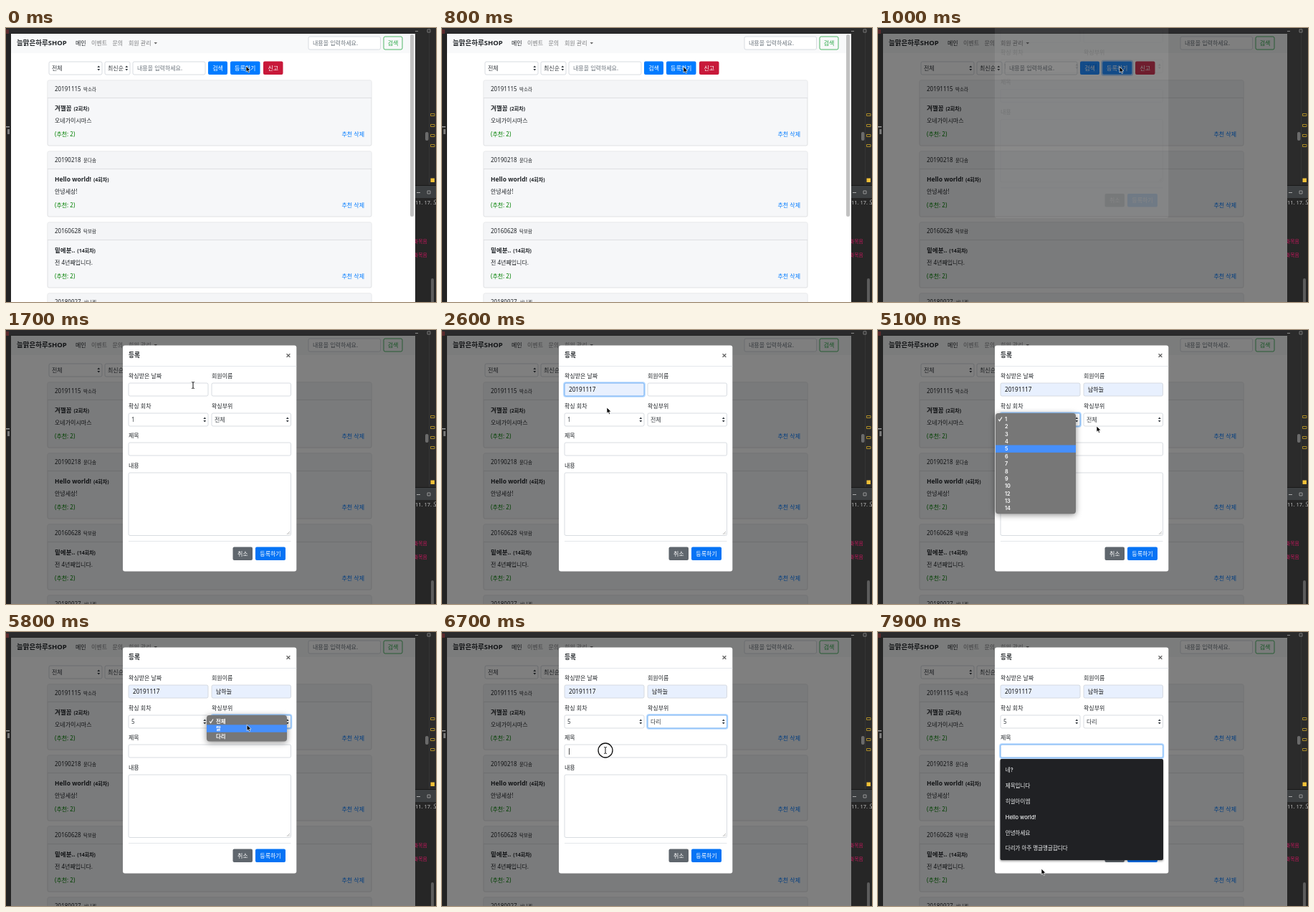
Animation, 600 px wide and 382 px high, one loop 8 s. Source, as an HTML page with a canvas:

```html
<!DOCTYPE html>
<html lang="ko">
<head>
<meta charset="utf-8">
<title>등록</title>
<style>
html, body { margin: 0; width: 100%; height: 100%; overflow: hidden; background: #232323; }
canvas { display: block; width: 600px; height: 382px; }
</style>
</head>
<body>
<canvas id="stage"></canvas>
<script>
const LOOP = 8000, STEP = 100;
const INK = '#212529', GRAY = '#3a3f44', MUTED = '#6c757d', BLUE = '#007bff', LINE = '#ced4da';
const SANS = '"Noto Sans", "Noto Sans CJK KR", "Noto Sans CJK", sans-serif';
const UI = 'Inter, "Noto Sans CJK KR", "Noto Sans CJK", sans-serif';

const dpr = window.devicePixelRatio || 1;

function sized(canvas) {
  canvas.width = 600 * dpr;
  canvas.height = 382 * dpr;
  return canvas.getContext('2d');
}

const stage = sized(document.getElementById('stage'));
const layer = sized(document.createElement('canvas'));
let c = stage;

const clamp = v => Math.max(0, Math.min(1, v));
const ramp = (t, from, len) => clamp((t - from) / len);
const during = (t, from, to) => t >= from && t < to;

function text(s, x, y, { size = 8, color = INK, weight = 400, align = 'left', font = SANS } = {}) {
  c.font = `${weight} ${size}px ${font}`;
  c.fillStyle = color;
  c.textAlign = align;
  c.fillText(s, x, y + size * 0.36);
}

function rect(x, y, w, h, fill) {
  c.fillStyle = fill;
  c.fillRect(x, y, w, h);
}

function box(x, y, w, h, fill, stroke, r = 2) {
  c.beginPath();
  c.roundRect(x, y, w, h, r);
  if (fill) { c.fillStyle = fill; c.fill(); }
  if (stroke) { c.strokeStyle = stroke; c.lineWidth = 0.8; c.stroke(); }
}

function path(points, fill, stroke, width = 1) {
  c.beginPath();
  points.forEach(([x, y]) => c.lineTo(x, y));
  if (fill) { c.closePath(); c.fillStyle = fill; c.fill(); }
  if (stroke) { c.strokeStyle = stroke; c.lineWidth = width; c.stroke(); }
}

// Draws a group on its own layer, so that it fades as one.
function faded(alpha, drawGroup) {
  if (alpha <= 0) return;
  if (alpha === 1) return drawGroup();
  c = layer;
  c.setTransform(1, 0, 0, 1, 0, 0);
  c.clearRect(0, 0, layer.canvas.width, layer.canvas.height);
  c.setTransform(dpr, 0, 0, dpr, 0, 0);
  drawGroup();
  c = stage;
  c.globalAlpha = alpha;
  c.drawImage(layer.canvas, 0, 0, 600, 382);
  c.globalAlpha = 1;
}

function shadowed(blur, alpha, drawShape) {
  c.save();
  c.shadowColor = `rgba(0,0,0,${alpha})`;
  c.shadowBlur = blur * dpr;
  c.shadowOffsetY = 1.5 * dpr;
  drawShape();
  c.restore();
}

function button(label, x, y, w, fill) {
  box(x, y, w, 18.5, fill);
  text(label, x + w / 2, y + 9.3, { color: '#fff', align: 'center' });
}

function ring(x, y, w, h, alpha = 1) {
  if (alpha <= 0) return;
  c.save();
  c.globalAlpha = alpha;
  c.beginPath();
  c.roundRect(x - 0.8, y - 0.8, w + 1.6, h + 1.6, 2.5);
  c.strokeStyle = 'rgba(0,123,255,.3)';
  c.lineWidth = 2;
  c.stroke();
  box(x, y, w, h, null, '#80bdff');
  c.restore();
}

function field(x, y, w, { h = 18, value = '', color = GRAY, fill = '#fff', focus = 0, size = 8, pad = 6 } = {}) {
  box(x, y, w, h, fill, LINE);
  ring(x, y, w, h, focus);
  text(value, x + pad, y + 9.3, { color, size });
}

function select(x, y, w, value, focus = 0) {
  field(x, y, w, { value, focus, pad: 4 });
  const ax = x + w - 4.7, ay = y + 9;
  path([[ax - 1.9, ay - 1], [ax, ay - 3.6], [ax + 1.9, ay - 1]], '#343a40');
  path([[ax - 1.9, ay + 1], [ax, ay + 3.6], [ax + 1.9, ay + 1]], '#343a40');
}

function desktop() {
  rect(0, 0, 600, 382, '#232323');
  rect(0, 0, 600, 7, '#2a2a2c');
  rect(0, 2, 4, 6, '#5b2a2c');
  rect(0, 137, 5, 1.5, '#999');
  rect(2, 141, 3, 7, '#777');
  rect(571, 0, 29, 219, '#2b2b2b');
  rect(590, 0, 1, 219, '#353535');
  rect(571, 4, 4, 1, '#888');
  box(588, 2, 4, 4, null, '#888', 0);
  box(585, 145, 4.5, 12, '#6b6b6b');
  [121, 136, 150, 164].forEach(y => box(592.5, y - 1.5, 5.5, 3, null, '#c9a227', 0));
  rect(592.5, 209.5, 5.5, 5.5, '#f2c037');
  rect(571, 219, 29, 18, '#3c3f41');
  rect(571, 219, 29, 1, '#191919');
  rect(573, 229, 5, 1, '#aaa');
  box(588, 227, 4, 4, null, '#aaa', 0);
  rect(571, 237, 29, 145, '#262626');
  text('11. 17. 오', 571, 243, { color: '#bbb', size: 7.5 });
  [298, 317].forEach(y => text('화목음', 569, y, { color: '#c2185b', size: 6.8 }));
  box(593, 349, 4, 40, '#5c5c5c');
}

function card(y, date, name, title, count, body) {
  box(58, y, 452, 91, '#f6f7f9', '#d9dadc');
  rect(58.4, y + 0.4, 451.2, 24, '#f4f5f7');
  rect(58, y + 24, 452, 0.8, '#d9dadc');
  text(date, 68, y + 12.5);
  text(name, 108, y + 13, { size: 6.5 });
  text(title, 68, y + 38.5, { size: 8.5, weight: 700 });
  const w = c.measureText(title).width;
  text(`(${count}회차)`, 71 + w, y + 39, { size: 7, weight: 700 });
  text(body, 68, y + 56.5);
  text('(추천: 2)', 68, y + 75.5, { color: '#008000' });
  text('추천 삭제', 500, y + 75.5, { color: BLUE, align: 'right' });
}

function page(t) {
  rect(7, 8, 564, 374, '#fff');
  rect(7, 8, 564, 27, '#f8f9fa');
  text('늘맑은하루SHOP', 15, 20.5, { size: 9.5, weight: 700 });
  text('메인', 97, 21);
  [['이벤트', 119], ['문의', 148.5], ['회원 관리', 171]].forEach(([s, x]) => text(s, x, 21, { color: '#7c7d7f' }));
  path([[206.5, 20], [211, 20], [208.8, 22.5]], '#666');
  field(422, 12, 100.5, { value: '내용을 입력하세요.', color: MUTED });
  box(527, 12, 26, 18, '#f8f9fa', '#28a745');
  text('검색', 540, 21, { color: '#28a745', align: 'center' });

  select(60, 47, 74, '전체');
  select(138, 47, 35, '최신순');
  field(177, 47, 101, { value: '내용을 입력하세요.', color: MUTED });
  button('검색', 282, 46.5, 27, BLUE);
  button('등록하기', 313, 46.5, 41.5, BLUE);
  ring(313, 46.5, 41.5, 18.5, ramp(t, 800, 100));
  button('신고', 359, 46.5, 27.5, '#c8193a');

  card(73, '20191115', '박소라', '겨깰꼼', 2, '오네가이시마스');
  card(172, '20190218', '윤다솜', 'Hello world!', 4, '안녕세상!');
  card(271, '20160628', '탁보람', '밑에분..', 14, '전 4년째입니다.');
  card(370, '20180927', '서나래', '', 1, '');
  if (t < 900) box(564, 9, 5, 254, '#c1c1c1', null, 2.5);
}

// Strength of a focus ring that is on between two times.
const focus = (t, from, to) => ramp(t, from, 150) * (1 - ramp(t, to, 150));

function caret(t, from, to, since, x, y) {
  if (during(t, from, to) && Math.floor((t - since) / 500) % 2 === 0) rect(x, y, 0.8, 9, '#222');
}

function modal(t) {
  box(163, 21.5, 242.3, 315, '#fff', null, 3);
  text('등록', 171, 35, { size: 8.7, weight: 700 });
  text('×', 394, 35, { size: 13, weight: 700, color: '#666', align: 'center' });
  rect(163, 50, 242.3, 0.8, '#dee2e6');

  [['왁싱받은 날짜', 171, 64], ['회원이름', 287, 64], ['확싱 회차', 171, 106], ['왁싱부위', 287, 106],
   ['제목', 171, 147], ['내용', 171, 189]].forEach(a => text(...a));

  const dated = t >= 2600, named = t >= 3900, preview = during(t, 3400, 3900);
  field(171, 74, 111, {
    value: dated ? '20191117' : '', fill: dated ? '#e8f0fe' : '#fff',
    color: '#111', size: 8.2, focus: focus(t, 1900, 2800)
  });
  field(287, 74, 110.5, {
    value: named ? '남하늘' : preview ? '하늘' : '', fill: named || preview ? '#e8f0fe' : '#fff',
    color: '#111', size: preview ? 6.5 : 8, focus: focus(t, 2800, 4500)
  });
  select(171, 116, 111, t < 5000 ? '1' : '5', focus(t, 4600, 5500));
  select(287, 116, 110.5, t < 6200 ? '전체' : '다리', focus(t, 5500, 6700));
  field(171, 157, 226.5, { focus: focus(t, 6700, LOOP) });
  field(171, 199, 226.5, { h: 87.5 });
  path([[392, 285], [396, 281]], null, '#888', 0.6);
  path([[394.3, 285], [396, 283.3]], null, '#888', 0.6);
  caret(t, 1900, 2600, 1900, 177, 78.5);
  caret(t, 2800, 4400, 2600, 292, 78.5);
  caret(t, 6600, LOOP, 6400, 177, 162);

  rect(171, 294, 226.5, 0.8, '#dee2e6');
  button('취소', 316.5, 302.5, 27.5, '#5f666d');
  button('등록하기', 348, 302.5, 42, '#0573f5');
}

function suggestions(x, y, w, items, my) {
  const row = 21.9;
  shadowed(3, 0.4, () => box(x, y, w, items.length * row + 9.5, '#202124'));
  items.forEach((s, i) => {
    const top = y + 4.5 + i * row;
    if (my >= top && my < top + row) rect(x, top, w, row, '#3f4042');
    text(s, x + 7.3, top + 10.7, { size: 7.5, color: '#f1f3f4', weight: 500, font: UI });
  });
}

const MENU_ROW = 10.37;

function menu(x, w, items, hot) {
  shadowed(8, 0.45, () => box(x, 116, w, items.length * MENU_ROW + 5.5, '#777', null, 4));
  if (items[hot]) rect(x, 119 + hot * MENU_ROW, w, MENU_ROW, '#468ffb');
  items.forEach((s, i) => text(s, x + 13, 124.3 + i * MENU_ROW, { size: 7.3, color: '#fff', weight: 600, font: UI }));
  path([[x + 4, 124.5], [x + 5.6, 126.8], [x + 9, 121.5]], null, '#fff', 1.1);
}

const MOVES = [
  [0, 335, 53], [900, 337, 54], [1200, 337, 54], [1600, 261, 77], [1800, 261, 77], [1900, 240, 83],
  [2200, 230, 108], [2600, 230, 108], [2800, 330, 83], [3000, 330, 83], [3400, 318, 102], [3600, 318, 102],
  [3800, 318, 130], [4000, 318, 130], [4400, 235, 124], [4700, 235, 124], [4900, 225, 166], [5000, 225, 166],
  [5100, 305, 134], [5400, 340, 124], [5700, 340, 124], [6000, 325, 145], [6200, 325, 145],
  [6600, 228, 165], [7000, 228, 165], [7800, 228, 330], [8000, 228, 330]
];

function mouse(t) {
  const i = MOVES.findIndex(m => m[0] > t);
  const [t0, x0, y0] = MOVES[i - 1], [t1, x1, y1] = MOVES[i];
  const p = (t - t0) / (t1 - t0), e = p * p * (3 - 2 * p);
  return [x0 + (x1 - x0) * e, y0 + (y1 - y0) * e];
}

function pointer(t, x, y) {
  if (during(t, 6600, 6900)) {
    c.beginPath();
    c.arc(x, y, 10, 0, 7);
    c.fillStyle = 'rgba(255,255,255,.85)';
    c.fill();
    c.strokeStyle = '#111';
    c.lineWidth = 1.3;
    c.stroke();
  }
  if (during(t, 1500, 2000) || during(t, 2700, 3100) || during(t, 6500, 7100)) {
    path([[x, y - 4], [x, y + 4]], null, '#111');
    [-1, 1].forEach(d => path([[x - 2, y + 4.6 * d], [x, y + 4 * d], [x + 2, y + 4.6 * d]], null, '#111', 0.8));
    return;
  }
  const shape = [[0, 0], [0, 8.2], [1.9, 6.5], [3.2, 9.4], [4.6, 8.8], [3.4, 6], [5.9, 5.8]]
    .map(([dx, dy]) => [x + dx, y + dy]);
  path([...shape, shape[0]], '#000', '#fff', 0.7);
}

const easeOut = p => 1 - Math.pow(1 - p, 1.8);

function draw(t) {
  c.setTransform(dpr, 0, 0, dpr, 0, 0);
  const [x, y] = mouse(t);
  const hovered = Math.floor((y - 119) / MENU_ROW);
  desktop();
  page(t);
  rect(7, 8, 564, 374, `rgba(0,0,0,${ramp(t, 850, 150) * 0.5})`);

  faded(ramp(t, 985, 200), () => {
    c.save();
    c.translate(0, -78.5 * (1 - easeOut(ramp(t, 985, 300))));
    modal(t);
    c.restore();
  });

  if (during(t, 2000, 2600)) suggestions(170.5, 93, 112, ['20191117', '20191115', '20190218', '20160628'], y);
  if (during(t, 3000, 3900)) suggestions(286, 93, 117, ['하늘', '남하늘', '박소라', '류가온', '서나래', '탁보람'], y + 2);
  if (t >= 6900) suggestions(170.5, 177, 227.5,
    ['네?', '제목입니다', '히얼아이엠', 'Hello world!', '안녕하세요', '다리가 아주 맹글맹글합디다'], y);

  if (t >= 4600) faded(1 - ramp(t, 5100, 200), () =>
    menu(164, 112, [1, 2, 3, 4, 5, 6, 7, 8, 9, 10, 12, 13, 14], t < 4900 ? hovered : 4));
  if (t >= 5600) faded(1 - ramp(t, 6200, 200), () =>
    menu(280, 112, ['전체', '팔', '다리'], t < 6000 ? hovered : 2));

  pointer(t, x, y);
}

function tick() {
  const t = performance.now() % LOOP;
  draw(Math.floor(t / STEP) * STEP);
  requestAnimationFrame(tick);
}
tick();
</script>
</body>
</html>
```
